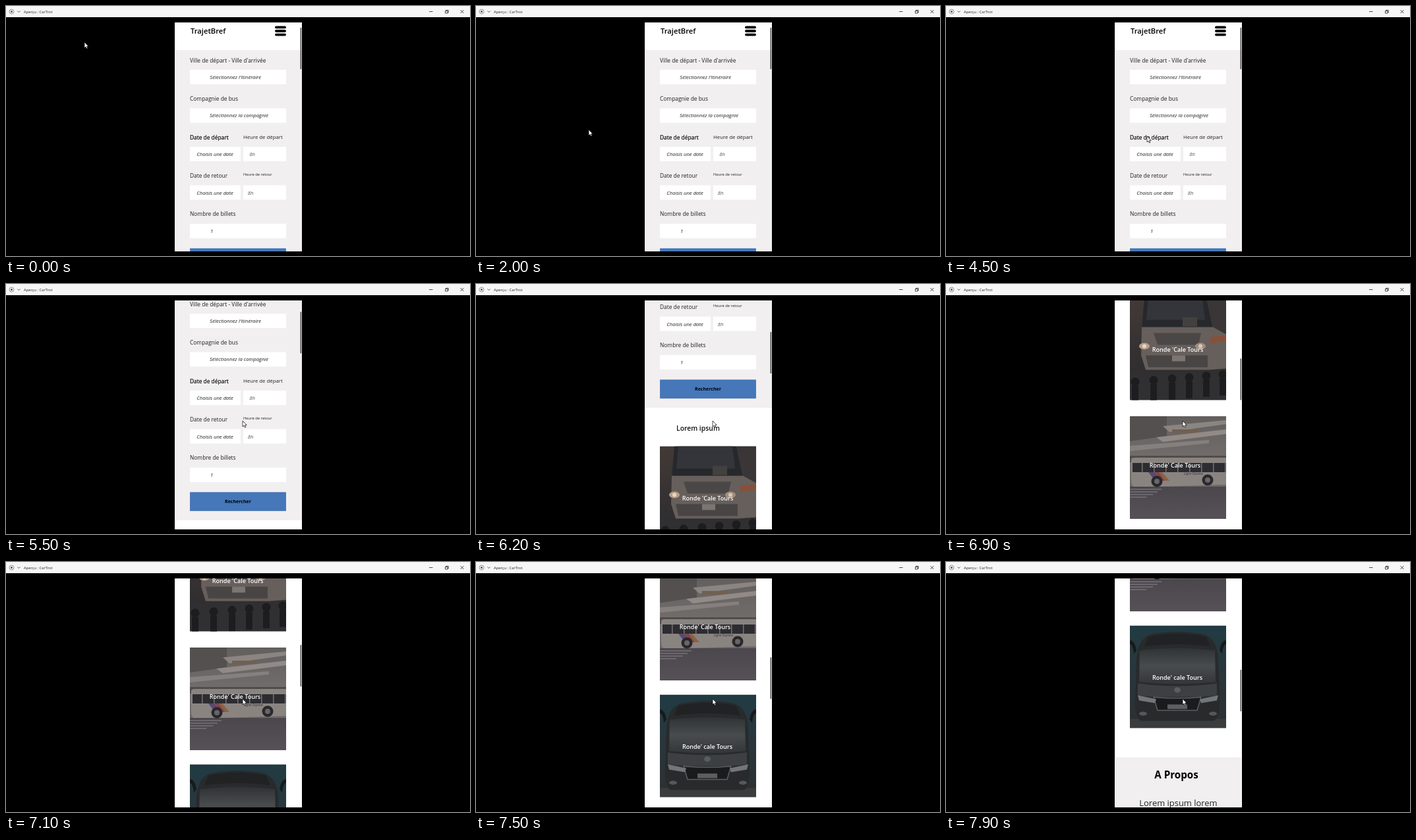
Recreate the animation shown at these times as an HTML page. Size 704 by 380 pixels, loop 8000 ms.

```html
<!DOCTYPE html>
<html lang="fr">
<head>
<meta charset="utf-8">
<style>
  html, body { margin: 0; width: 100%; height: 100%; overflow: hidden; background: #000; }
  svg { display: block; }
  text { font-family: "Open Sans", "Noto Sans", sans-serif; white-space: pre; }
</style>
</head>
<body>
<svg id="stage" width="704" height="380" viewBox="0 0 704 380"></svg>
<script>
const LOOP = 8000, STEP = 100;

// [time, scroll offset]
const scrollKeys = [[5200, 0], [5300, 12], [5400, 36], [5500, 52], [5600, 52],
  [6500, 308], [7100, 520], [7900, 731]];

// [time, x, y] of the pointer tip
const pointerKeys = [[0, 119, 55], [100, 138, 72], [200, 163, 93], [300, 211, 155],
  [700, 211, 155], [900, 302, 160], [1100, 302, 160], [1300, 390, 141], [1400, 419, 143],
  [1900, 419, 143], [2000, 171, 188], [3000, 171, 188], [3600, 240, 185],
  [3800, 240, 185], [4500, 305, 198], [4700, 333, 204], [4800, 333, 204], [5000, 359, 208]];

const rect = (x, y, w, h, fill, extra = '') =>
  `<rect x="${x}" y="${y}" width="${w}" height="${h}" fill="${fill}" ${extra}/>`;
const path = (d, fill, extra = '') => `<path d="${d}" fill="${fill}" ${extra}/>`;
const line = (d, stroke, width, extra = '') =>
  path(d, 'none', `stroke="${stroke}" stroke-width="${width}" ${extra}`);
const oval = (x, y, rx, ry, fill, extra = '') =>
  `<ellipse cx="${x}" cy="${y}" rx="${rx}" ry="${ry}" fill="${fill}" ${extra}/>`;
// y is the middle of the capitals
const text = (s, x, y, size, fill = '#222', extra = '') =>
  `<text x="${x}" y="${y + size * .36}" font-size="${size}" fill="${fill}" ${extra}>${s}</text>`;
const MID = 'text-anchor="middle"', BOLD = MID + ' font-weight="700"',
  SEMI = 'font-weight="600"', ITALIC = 'font-style="italic"';
const label = (s, x, y, size = 8.4) => text(s, x, y, size);
const hint = (s, x, y, fill = '#222') => text(s, x, y, 7.7, fill, MID + ' ' + ITALIC);
const field = (x, y, w) => rect(x, y, w, 22, '#fff');
const gradient = (id, ...colors) => `<linearGradient id="${id}" x2="0" y2="1">` +
  colors.map((c, i) => `<stop offset="${i / (colors.length - 1)}" stop-color="${c}"/>`).join('') +
  '</linearGradient>';
const card = (y, art, name, x, textY) =>
  `<svg x="279" y="${y}" width="146" height="156">${art}</svg>` +
  text(name, x, textY, 9.05, '#fff', MID + ' ' + SEMI);

function titleBar() {
  return rect(0, 0, 704, 17, '#f6f6f6') +
    `<circle cx="8.5" cy="8.5" r="3.5" fill="none" stroke="#777" stroke-width=".8"/>` +
    oval(8.5, 8.5, 1.5, 1.5, '#555') +
    line('M17.5 7.5l2 2 2-2', '#444', .9) +
    text('Aperçu : CarTrot', 27, 8.6, 5.8, '#222') +
    line('M642 8.5h5.5M666.5 7.5h3.5v3.5h-3.5zM667.5 7.5v-1.2h3.7v3.7h-1.2M689.5 6l5 5M694.5 6l-5 5',
      '#222', .8);
}

function form() {
  const departure = label('Date de départ', 279, 199.5);
  return rect(256, 67, 193, 344, '#f1eff0') +
    text('TrajetBref', 280, 38.3, 11.2, '#000', SEMI) +
    line('M410 32.4h13M410 38h13M410 43.6h13', '#000', 3.9, 'stroke-linecap="round"') +
    label("Ville de départ - Ville d'arrivée", 279, 82.5) +
    field(279, 97, 146) + hint("Sélectionnez l'itinéraire", 348.2, 108) +
    label('Compagnie de bus', 279, 141) +
    field(279, 155.5, 146) + hint('Sélectionnez la compagnie', 353.5, 166.5) +
    departure + departure + label('Heure de départ', 360, 199.3, 7.8) +
    field(279, 214, 77) + hint('Choisis une date', 317, 225.5) +
    field(360, 214, 65) + hint('8h', 373.5, 225.5, '#555') +
    label('Date de retour', 279, 258) + label('Heure de retour', 360, 256.3, 5.85) +
    field(279, 272.5, 77) + hint('Choisis une date', 317, 284) +
    field(360, 272.5, 65) + hint('8h', 371, 284, '#555') +
    label('Nombre de billets', 279, 316) +
    field(279, 331, 146) + hint('1', 312, 342) +
    rect(279.3, 368.8, 145.4, 28, '#4577b9', 'stroke="#3b6aad" stroke-width=".6"') +
    text('Rechercher', 352, 382.7, 7.05, '#000', BOLD);
}

function duskBus() {
  let art = rect(0, 0, 146, 156, 'url(#dusk)') +
    path('M22 0H116L126 48H18z', '#26282c') +
    path('M28 0H110L114 34H25z', '#34353a') +
    rect(80, 30, 22, 14, '#43413f') +
    path('M116 0H146V62L126 48z', '#3a3638') +
    path('M18 45H126L146 56V108L120 110H24L17 88z', '#665f5c') +
    path('M122 60L146 58V66L122 70z', '#88503a') +
    path('M36 54H108L104 72H42z', '#4b4747') +
    path('M24 88H118V106H28z', '#494545') +
    rect(64, 88, 20, 9, '#7c7672') +
    oval(22, 74, 8, 5, '#b89f86') + oval(22, 74, 3, 3, '#e6d8c4') +
    oval(107, 74, 8, 5, '#a18d7b') + oval(107, 74, 3, 3, '#d8c8b4') +
    rect(0, 112, 146, 44, '#302f31');
  [8, 36, 64, 90, 116, 141].forEach((x, i) => {
    const y = 128 - i * 2.2;
    art += oval(x, y, 6.5, 6.5, '#1d1c1e') + rect(x - 5, y + 6, 10, 26, '#1d1c1e');
  });
  return art;
}

function cityBus() {
  let art = rect(0, 0, 146, 156, 'url(#street)') +
    path('M0 0H56V30L0 38z', '#53504f') +
    path('M50 15L146 6V12L60 24z', '#8b8582') +
    path('M40 32L146 20V27L50 39z', '#918a86') +
    path('M0 45L120 36V41L0 53z', '#85807d') +
    rect(64, 20, 38, 5, '#725f4e') +
    rect(0, 60, 146, 10, '#504c4c') +
    path('M2 66Q2 63 8 63H146V104L8 108Q2 107 2 98z', '#8a8481') +
    rect(4, 71, 142, 14, '#2c2c31');
  for (let x = 18; x < 146; x += 18) art += rect(x, 71, 1.5, 14, '#77716f');
  art += path('M28 85H37L47 98H38z', '#594873') + path('M37 85H44L54 98H47z', '#87434f') +
    path('M44 85H49L60 98H54z', '#8b643e') +
    text('Ligne Express', 82, 87, 5, '#353044', ITALIC) +
    rect(0, 107, 146, 49, 'url(#road)');
  for (const [x, y] of [[41, 99], [118, 97]])
    art += oval(x, y, 8.5, 8.5, '#29282b') + oval(x, y, 4, 4, '#69656a');
  return art + line('M0 111H48M0 115H42M0 119H35M0 123H25', '#77727a', 1.3);
}

function coach() {
  const half = path('M0 22Q8 24 10 38L6 43Q5 30 0 28z', '#17191b') +
    path('M12 106L40 112 38 118 14 114z', '#727678') +
    oval(20, 134, 6, 3, '#55585a');
  return rect(0, 0, 146, 156, 'url(#teal)') +
    rect(0, 142, 146, 14, '#3b3c3d') +
    path('M10 50Q12 18 34 13Q73 6 110 13Q132 18 134 50L136 110Q137 138 128 145H16Q7 138 8 110z', '#282a2c') +
    path('M28 17Q73 8 116 17L122 32Q73 25 22 32z', '#202224') +
    path('M15 38Q73 31 129 38L130 86Q73 92 14 86z', 'url(#glass)') +
    path('M12 88Q73 96 132 88L132 106Q73 114 12 106z', '#3d4042') +
    path('M34 109H110L102 129H42z', '#191b1d') +
    line('M36 109Q73 112 108 109L102 129H42z', '#5c6062', 1.5) +
    oval(72, 98, 5, 4, '#595d5f') + rect(57, 120, 30, 7, '#5c5f60') +
    half + `<g transform="matrix(-1 0 0 1 146 0)">${half}</g>`;
}

document.getElementById('stage').innerHTML =
  '<defs>' + gradient('dusk', '#433a37', '#353132', '#2b2a2c') +
  gradient('street', '#625f5e', '#75706e', '#5e5959') + gradient('road', '#4b474c', '#565157') +
  gradient('teal', '#213b43', '#29363b', '#2d2f31') + gradient('glass', '#303335', '#494c4d', '#333638') +
  '</defs>' + titleBar() +
  '<svg x="256" y="25" width="193" height="348" viewBox="256 25 193 348">' +
  rect(256, 25, 193, 348, '#fff') + '<g id="page">' + form() +
  text('Lorem ipsum', 304, 442, 10.4, '#111', SEMI) +
  card(469.5, duskBus(), "Ronde 'Cale Tours", 351.5, 548.3) +
  card(650, cityBus(), "Ronde' Cale Tours", 347.5, 725) +
  card(827.5, coach(), "Ronde' cale Tours", 351, 907) +
  rect(257, 1028, 191, 200, '#f1eff0') +
  text('A Propos', 349.5, 1055, 15.2, '#000', BOLD) +
  text('Lorem ipsum lorem', 352.5, 1097.3, 12.95, '#222', MID) + '</g>' +
  rect(446.5, 33, 1.7, 63, '#555', 'id="thumb"') + '</svg>' +
  path('M0 0V8.8L2 7 3.4 10 4.9 9.3 3.6 6.4H6.2z', '#fff',
    'id="pointer" stroke="#000" stroke-width=".7"');

const [page, thumb, pointer] = ['page', 'thumb', 'pointer'].map(id => document.getElementById(id));

function sample(keys, t) {
  const i = keys.findIndex(k => k[0] > t);
  if (i === 0) return keys[0].slice(1);
  if (i < 0) return keys[keys.length - 1].slice(1);
  const a = keys[i - 1], b = keys[i], p = (t - a[0]) / (b[0] - a[0]);
  return a.slice(1).map((v, n) => v + (b[n + 1] - v) * p);
}

const move = (el, x, y) => el.setAttribute('transform', `translate(${x} ${y})`);
const start = performance.now();

function draw() {
  const t = Math.floor((performance.now() - start) % LOOP / STEP) * STEP;
  const scroll = Math.round(sample(scrollKeys, t)[0]);
  move(page, 0, -scroll);
  move(thumb, 0, scroll * .179);
  move(pointer, ...sample(pointerKeys, t));
  requestAnimationFrame(draw);
}
draw();
</script>
</body>
</html>
```
